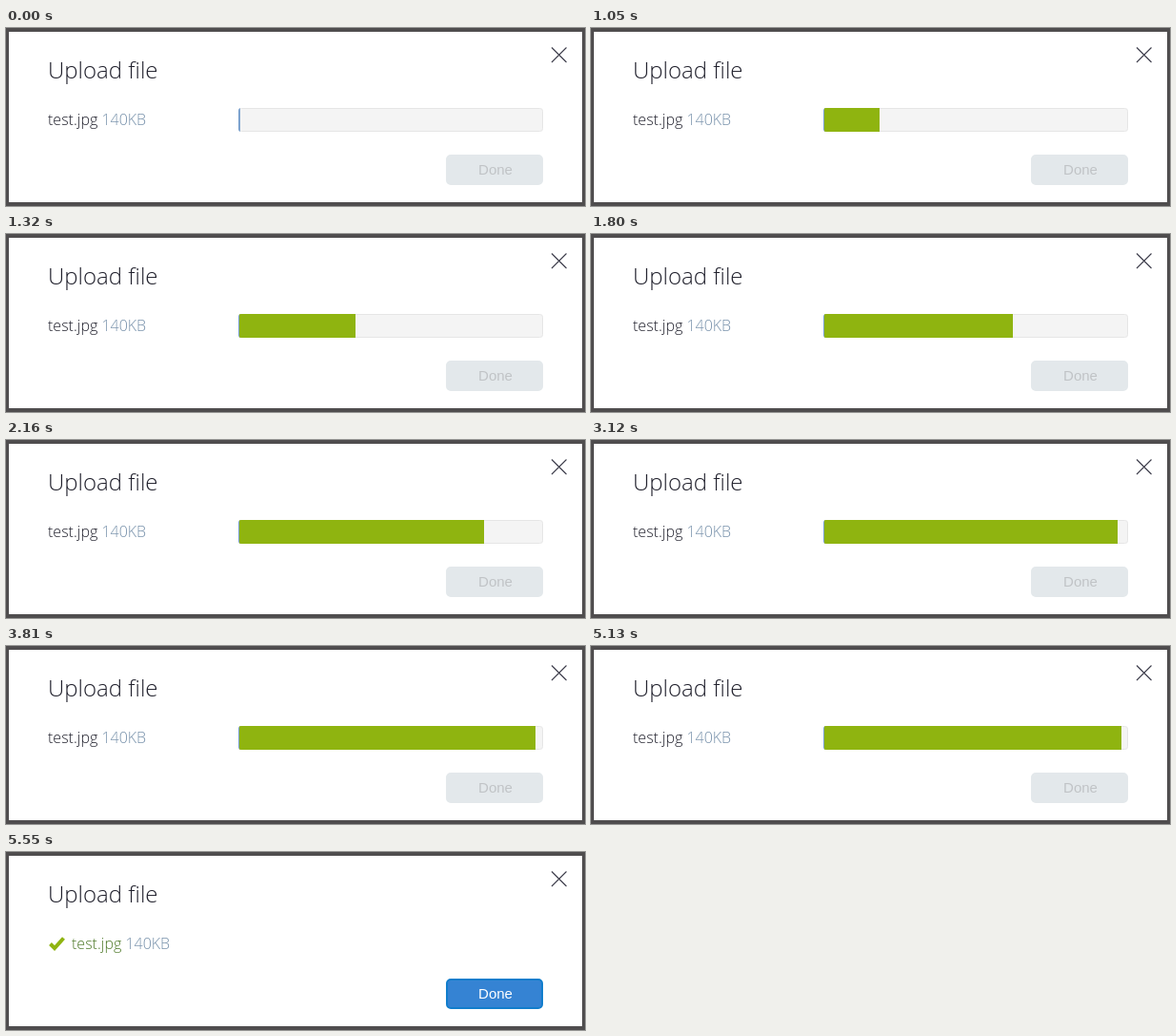
Animation, 608 px wide and 187 px high, one loop 6.39 s. Source, as an HTML page:

```html
<!DOCTYPE html>
<html lang="en">
<head>
<meta charset="utf-8">
<title>Upload file</title>
<style>
  html, body { margin: 0; width: 100%; height: 100%; overflow: hidden; background: #4f4d4e; }
  svg { display: block; width: 608px; height: 187px; }
  text { font: 300 16px "Open Sans", sans-serif; fill: #20202c; }
  .title { font-size: 24px; }
  .size { fill: #7690aa; }
  .done .name { fill: #4f7a2a; }
  .button rect { fill: #e3e8eb; }
  .button text { font: 15px "Liberation Sans", Arial, sans-serif; fill: #c0c3c6; text-anchor: middle; }
  .button.enabled rect { fill: #3583d3; stroke: #117dcc; stroke-width: 2; }
  .button.enabled text { fill: #fff; }
</style>
</head>
<body>
<svg viewBox="0 0 608 187">
  <rect x="3" y="4" width="602" height="179" fill="#fff"/>
  <text class="title" x="44" y="53">Upload file</text>
  <path d="M573 20.5l15.5 15.5M588.5 20.5l-15.5 15.5" stroke="#3c3c4a" stroke-width="1.1"/>

  <g id="file">
    <text id="label" x="44" y="102"><tspan class="name">test.jpg</tspan> <tspan class="size">140KB</tspan></text>
  </g>
  <path id="check" d="M46.5 96.5l4.5 4.5 9.5-10.5" fill="none" stroke="#8fb410" stroke-width="4"/>

  <g id="bar">
    <clipPath id="track"><rect x="244" y="84" width="320" height="25" rx="3"/></clipPath>
    <g clip-path="url(#track)">
      <rect x="244" y="84" width="320" height="25" fill="#f4f4f4"/>
      <rect x="244.5" y="84.5" width="319" height="24" rx="3" fill="none" stroke="#e6e6e6"/>
      <rect x="244" y="84" width="2" height="25" fill="#7da3cf"/>
      <rect id="fill" x="245" y="84" width="0" height="25" fill="#8fb410"/>
    </g>
  </g>

  <g id="button" class="button">
    <rect x="463" y="134" width="100" height="30" rx="4" stroke="#e3e8eb" stroke-width="2"/>
    <text x="514" y="154">Done</text>
  </g>
</svg>
<script>
  const LOOP = 6390, STEP = 30, UPLOADED = 5520, ENABLED = 5550;

  // [time in ms, right edge of the progress fill]
  const knots = [
    [870, 245], [1050, 303], [1320, 367], [1530, 392], [1800, 443],
    [2190, 506], [2550, 543], [2850, 549],
    [2870, 549], [3182, 553], [3530, 553], [3890, 556], [5030, 556], [5390, 559]
  ];
  const $ = id => document.getElementById(id);
  const show = (id, visible) => $(id).setAttribute('visibility', visible ? 'visible' : 'hidden');

  const secant = i => i < 0 || i > knots.length - 2 ? 0 :
    (knots[i + 1][1] - knots[i][1]) / (knots[i + 1][0] - knots[i][0]);

  function slope(i) {
    if (i === 0) return secant(0);
    const a = secant(i - 1), b = secant(i);
    return a * b > 0 ? 2 * a * b / (a + b) : 0;
  }

  // Monotone cubic interpolation keeps the fill from overshooting.
  function edgeAt(time) {
    const last = knots.length - 1;
    if (time <= knots[0][0]) return knots[0][1];
    if (time >= knots[last][0]) return knots[last][1];
    const i = knots.findIndex(k => k[0] > time) - 1;
    const [t0, x0] = knots[i], [t1, x1] = knots[i + 1];
    const d = t1 - t0, u = (time - t0) / d, v = 1 - u;
    return v * v * (1 + 2 * u) * x0 + u * u * (3 - 2 * u) * x1
      + d * u * v * (v * slope(i) - u * slope(i + 1));
  }

  function draw(now) {
    const time = Math.floor(now % LOOP / STEP) * STEP;
    const uploaded = time >= UPLOADED;
    $('fill').setAttribute('width', Math.round(edgeAt(time)) - 245);
    show('bar', !uploaded);
    show('check', uploaded);
    $('file').setAttribute('class', uploaded ? 'done' : '');
    $('label').setAttribute('x', uploaded ? 69 : 44);
    $('button').setAttribute('class', time >= ENABLED ? 'button enabled' : 'button');
  }

  const start = performance.now();
  function tick() {
    draw(performance.now() - start);
    requestAnimationFrame(tick);
  }
  tick();
</script>
</body>
</html>
```
